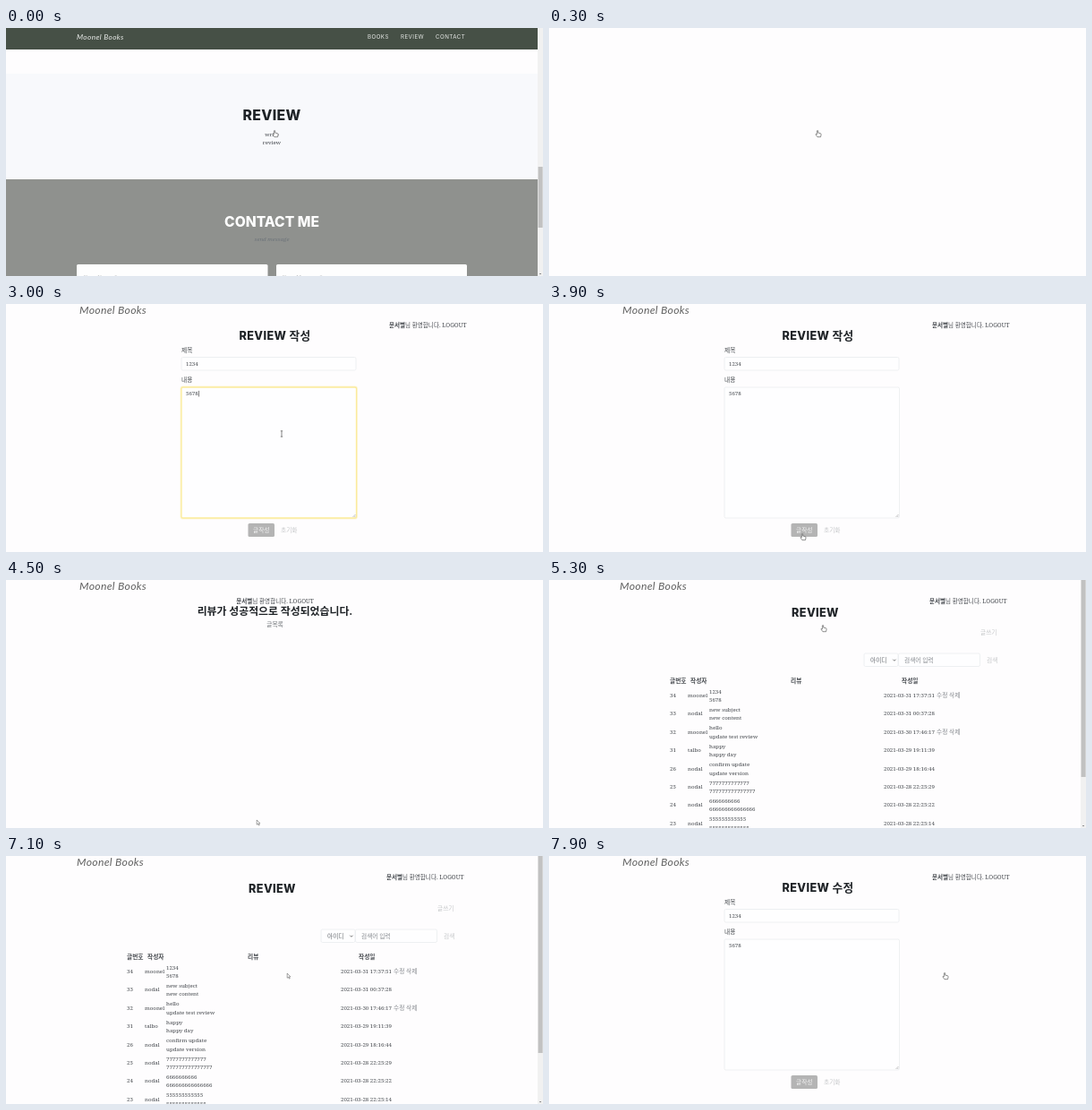
Recreate the animation shown at these times as an HTML page. Size 600x277 px, loop 8000 ms.

```html
<!DOCTYPE html>
<html lang="ko">
<head>
<meta charset="utf-8">
<title>Book reviews</title>
<style>
  html, body { margin: 0; width: 100%; height: 100%; overflow: hidden; background: #fefdfe; }
  svg { display: block; width: 600px; height: 277px; }
  text { font: 6.15px "Noto Serif", "Noto Sans CJK KR", "Noto Sans CJK", serif; fill: #43474c; white-space: pre; }
  .ko { font-size: 6.7px; }
  .hi { font-size: 6.55px; }
  .b { font-weight: 700; }
  .mid { text-anchor: middle; }
  .head { font: 800 12.7px Inter, "Noto Sans CJK KR", "Noto Sans CJK", sans-serif; fill: #1f2327; letter-spacing: .35px; }
  .nav { font: 6.2px Inter, sans-serif; fill: #e6e8e6; letter-spacing: .45px; }
  .logo { font: italic 12.2px Lato, sans-serif; fill: #606060; letter-spacing: .3px; }
  .pale { fill: #c4c6c8; }
  .box { fill: #fefeff; stroke: #eaecef; stroke-width: .8; }
  .focus { stroke: #fbeb9c; stroke-width: 1.3; }
  .glow { fill: none; stroke: #fdf3c4; stroke-width: 3; opacity: .7; }
</style>
</head>
<body>
<svg id="stage" viewBox="0 0 600 277"></svg>
<script>
const LOOP = 8000, BRAND = 'Moonel Books', USER = 'moonel';

const text = (x, y, s, cls = '', style = '') =>
  `<text x="${x}" y="${y}" class="${cls}" style="${style}">${s}</text>`;
const rect = (x, y, w, h, fill, r = 0) =>
  `<rect x="${x}" y="${y}" width="${w}" height="${h}" rx="${r}" fill="${fill}"/>`;
const box = (x, y, w, h, focus) => {
  const shape = cls => `<rect x="${x}" y="${y}" width="${w}" height="${h}" rx="1.6" class="${cls}"/>`;
  return (focus ? shape('glow') : '') + shape(focus ? 'box focus' : 'box');
};
const logo = x => text(x, 11.3, BRAND, 'logo');
const greet = (x, cls = '') =>
  text(x, 26, '<tspan class="b">문서별</tspan>님 환영합니다. LOGOUT', 'hi ' + cls);
const scrollbar = (y, h) => rect(594, 0, 6, 277, '#f1f1f1') + rect(594.6, y, 5, h, '#c1c1c1') +
  '<path d="M595.8 274l1.2 1.6 1.2-1.6z" fill="#777"/>';

function home() {
  return rect(0, 51, 600, 118, '#f8f9fc') + rect(0, 169, 600, 108, '#8f918e') +
    rect(0, 0, 600, 24, '#465046') +
    text(79, 13, BRAND, 'logo', 'font-size:8.2px;fill:#eef0ee;letter-spacing:.4px') +
    text(404, 12.3, 'BOOKS', 'nav') + text(441, 12.3, 'REVIEW', 'nav') + text(480, 12.3, 'CONTACT', 'nav') +
    text(297, 102.8, 'REVIEW', 'head mid', 'font-size:15.8px') +
    text(297, 120.5, 'write', 'mid') + text(297, 129.5, 'review', 'mid') +
    text(297, 221.7, 'CONTACT ME', 'head mid', 'font-size:15.6px;fill:#fff;letter-spacing:0') +
    text(297, 237.5, 'send message', 'mid', 'font-style:italic;fill:#6c737a') +
    rect(79, 264, 213.5, 20, '#fefefe', 1.6) + rect(302, 264, 213, 20, '#fefefe', 1.6) +
    text(87, 279.5, 'Your Name *', 'pale') + text(309, 279.5, 'Your Message *', 'pale') +
    scrollbar(155, 68);
}

function form(verb, title, body, focus) {
  const field = (y, s, on) => text(201, y, s) +
    (on ? rect(201.3 + s.length * 3.44, y - 5.4, .6, 6.6, '#333') : '');
  return logo(82) + greet(428) +
    text(300.5, 40, 'REVIEW ' + verb, 'head mid') +
    text(196, 53.5, '제목', 'ko') + box(196, 59.5, 195, 14.5, focus === 1) + field(69, title, focus === 1) +
    text(196, 87.3, '내용', 'ko') + box(196, 93, 195.5, 146, focus === 2) + field(102.3, body, focus === 2) +
    '<path d="M387.5 238l3-3M389.3 238l1.2-1.2" stroke="#888" stroke-width=".5"/>' +
    rect(270.5, 245, 29.5, 15, '#b4b4b4', 1.6) +
    text(285.3, 255, '글작성', 'ko mid', 'fill:#f4f4f4') + text(307, 255, '초기화', 'ko pale');
}

function done() {
  return logo(82) + greet(300.5, 'mid') +
    text(300.5, 39, '리뷰가 성공적으로 작성되었습니다.', 'head mid', 'font-size:11.9px;font-weight:700;letter-spacing:0') +
    text(300.5, 52.3, '글목록', 'ko mid', 'fill:#6d7176');
}

const rows = [
  [34, USER, '1234', '5678', '31 17:37:51'],
  [33, 'nodal', 'new subject', 'new content', '31 00:37:28'],
  [32, USER, 'hello', 'update test review', '30 17:46:17'],
  [31, 'talbo', 'happy', 'happy day', '29 19:11:39'],
  [26, 'nodal', 'confirm update', 'update version', '29 18:16:44'],
  [25, 'nodal', '7'.repeat(13), '7'.repeat(15), '28 22:25:29'],
  [24, 'nodal', '6'.repeat(10), '6'.repeat(15), '28 22:25:22'],
  [23, 'nodal', '5'.repeat(12), '5'.repeat(13), '28 22:25:14']
];

function list() {
  const heads = [[135, '글번호'], [158, '작성자'], [270, '리뷰'], [394, '작성일']];
  return logo(79) + greet(425) + text(297.5, 40.7, 'REVIEW', 'head mid') +
    text(482, 60.8, '글쓰기', 'ko pale') +
    box(352, 82, 38, 14.5) + box(390.5, 82, 91, 14.5) +
    text(359, 91.6, '아이디', 'ko', 'fill:#6b6f74') + text(397, 91.6, '검색어 입력', 'ko', 'fill:#84888d') +
    '<path d="M384.3 88.7l1.6 1.6 1.6-1.6" fill="none" stroke="#555" stroke-width=".8"/>' +
    text(489, 91.6, '검색', 'ko pale') +
    heads.map(([x, s]) => text(x, 115.2, s, 'ko b')).join('') +
    rows.map(([id, user, subject, content, date], i) => {
      const y = 131 + i * 20.4;
      return text(135, y, id) + text(155, y, user) +
        text(179, y - 4.5, subject) + text(179, y + 5, content) +
        text(374, y, '2021-03-' + date) +
        (user === USER ? text(433, y, '수정 삭제', 'ko', 'fill:#84888d') : '');
    }).join('') + scrollbar(0, 220);
}

// Pointers are drawn around their own centre.
const pointers = {
  hand: '<path d="M-1.6 .8V-3.2q.7-1 1.3 0v2.3l2.6 .6q.9 .3 .8 1.3l-.6 2.7h-3.6l-2-2.8q0-1 1.5-.1z" fill="#fff" stroke="#555" stroke-width=".65"/>',
  beam: '<path d="M-1.2-3.2h2.4M0-3.2v6.4M-1.2 3.2h2.4" fill="none" stroke="#555" stroke-width=".7"/>',
  arrow: '<path d="M-1.8-3v5.2l1.3-1 .9 1.9 .8-.4-.9-1.8h1.6z" fill="#fff" stroke="#666" stroke-width=".6"/>'
};
// time, x, y, pointer used from that time on
const moves = [
  [0, 301, 118, 'hand'], [700, 301, 118, 'beam'], [1000, 289, 71, 'beam'],
  [1200, 289, 71, 'beam'], [1500, 289, 45, 'arrow'], [1600, 289, 45, 'beam'],
  [2000, 308, 145, 'beam'], [3100, 308, 145, 'beam'], [3600, 285, 254, 'hand'],
  [3700, 285, 254, 'hand'], [4200, 282, 271, 'arrow'], [4500, 282, 271, 'arrow'],
  [5000, 307, 54, 'hand'], [5400, 307, 54, 'arrow'], [6100, 345, 105, 'arrow'],
  [6200, 345, 105, 'arrow'], [6900, 316, 134, 'arrow'], [7100, 316, 134, 'arrow'],
  [7500, 443, 134, 'hand'], [LOOP, 443, 134, 'hand']
];

function pointer(t) {
  const i = moves.findIndex(m => m[0] > t);
  const [t0, x0, y0, kind] = moves[i - 1], [t1, x1, y1] = moves[i];
  const k = (t - t0) / (t1 - t0), p = k * k * (3 - 2 * k);
  return `<g transform="translate(${x0 + (x1 - x0) * p} ${y0 + (y1 - y0) * p})">${pointers[kind]}</g>`;
}

const typed = (s, times, t) => s.slice(0, times.filter(at => at <= t).length);

function page(t) {
  if (t < 100) return home();
  if (t < 400) return '';
  if (t < 4400) {
    const focus = t < 900 ? 0 : t < 2000 ? 1 : t < 3800 ? 2 : 0;
    return form('작성', typed('1234', [1300, 1400, 1500, 1700], t),
      typed('5678', [2500, 2800, 2900, 3000], t), focus);
  }
  if (t < 5300) return done();
  if (t < 7800) return list();
  return form('수정', '1234', '5678', 0);
}

const stage = document.getElementById('stage');
let shown = -1;
function draw(now) {
  const t = Math.floor(now % LOOP / 100) * 100;
  if (t !== shown) {
    shown = t;
    stage.innerHTML = rect(0, 0, 600, 277, '#fefdfe') + page(t) + pointer(t);
  }
  requestAnimationFrame(draw);
}
draw(0);
</script>
</body>
</html>
```
